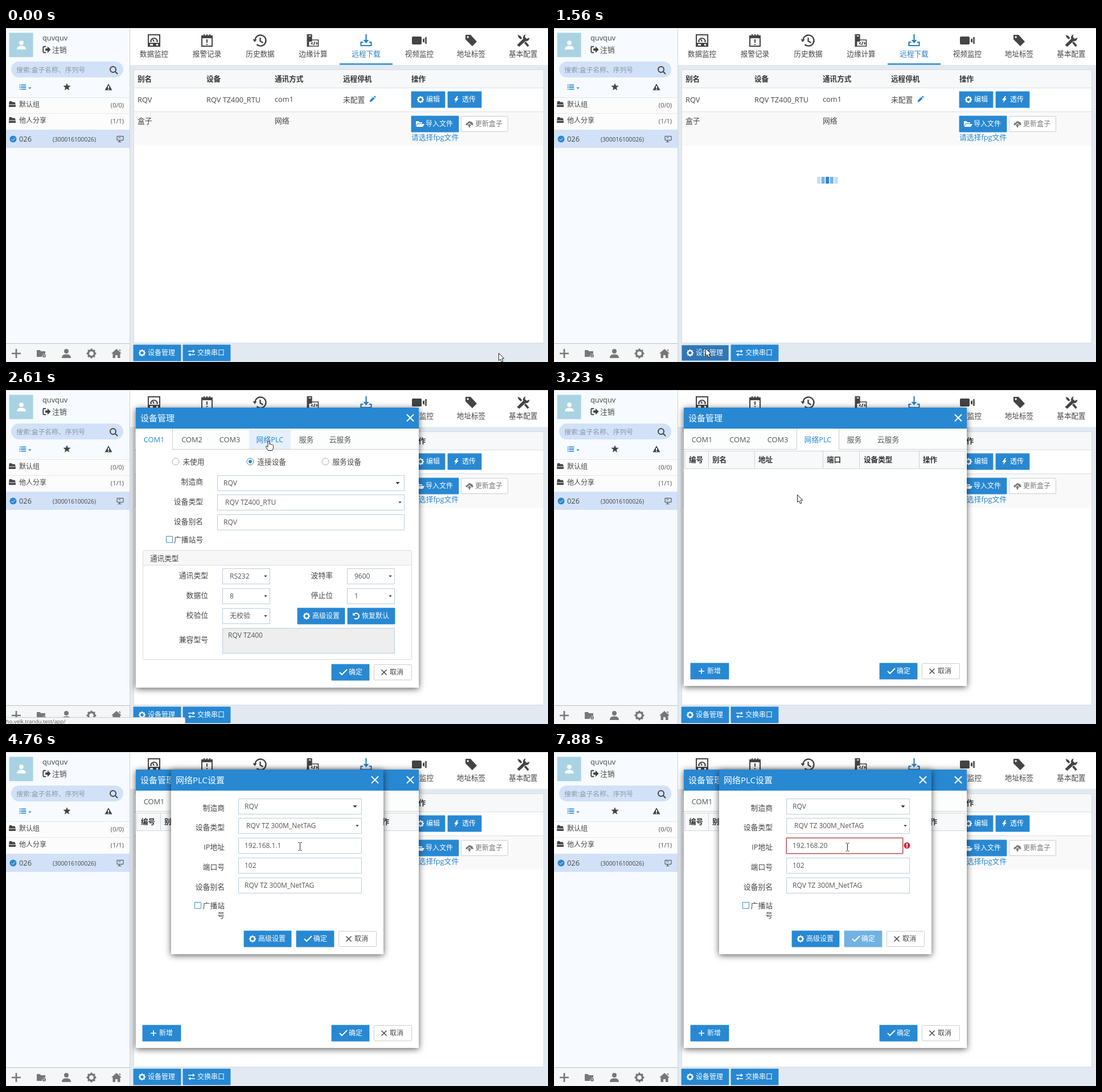
An HTML page with a canvas for the animation above (8 s loop, 952 px wide and 588 px high).

```html
<!DOCTYPE html>
<html lang="zh-CN">
<head>
<meta charset="utf-8">
<style>
html, body { margin: 0; width: 100%; height: 100%; overflow: hidden; background: #e2e9f0; }
canvas { display: block; }
</style>
</head>
<body>
<canvas id="stage" width="952" height="588"></canvas>
<script>
const ctx = document.getElementById('stage').getContext('2d');
const LOOP = 8000;
const BLUE = '#2888d2', DARK = '#444', GREY = '#555', FIELD = '#b9ccdb';
const BRAND = 'RQV', NET_MODEL = 'RQV TZ 300M_NetTAG';

// ---- primitives ----
function box(x, y, w, h, fill, stroke, r = 0) {
  ctx.beginPath();
  const o = stroke ? 0.5 : 0;
  ctx.roundRect(x + o, y + o, w - 2 * o, h - 2 * o, r);
  if (fill) { ctx.fillStyle = fill; ctx.fill(); }
  if (stroke) { ctx.strokeStyle = stroke; ctx.lineWidth = 1; ctx.stroke(); }
}

function text(s, x, y, { size = 12.8, color = DARK, align = 'left', weight = 400 } = {}) {
  ctx.font = `${weight} ${size}px "Open Sans", "Noto Sans CJK SC", "Noto Sans CJK", sans-serif`;
  ctx.fillStyle = color;
  ctx.textAlign = align;
  ctx.fillText(s, x, Math.round(y + size * 0.37));
}

function disc(x, y, r, fill, stroke) {
  ctx.beginPath();
  ctx.arc(x, y, r, 0, 7);
  if (fill) { ctx.fillStyle = fill; ctx.fill(); }
  if (stroke) { ctx.strokeStyle = stroke; ctx.lineWidth = 1; ctx.stroke(); }
}

// ---- icons: [filled path, stroked path, line width], centred on 0,0 ----
const gearPath = Array.from({ length: 32 }, (_, i) => {
  const a = (i - 0.5) * Math.PI / 16, r = i % 4 < 2 ? 6.2 : 5;
  return `${i ? 'L' : 'M'}${r * Math.cos(a)} ${r * Math.sin(a)}`;
}).join('') + 'zM2.700 0A2.700 2.700 0 1 0-2.700 0A2.700 2.700 0 1 0 2.700 0z';
const starPath = Array.from({ length: 10 }, (_, i) => {
  const a = i * Math.PI / 5, r = i % 2 ? 3 : 7;
  return `${i ? 'L' : 'M'}${r * Math.sin(a)} ${-r * Math.cos(a)}`;
}).join('') + 'z';

const icons = {
  gear: [gearPath],
  star: [starPath],
  user: ['M-4-4a4 4 0 1 1 8 0a4 4 0 1 1-8 0zM-8 8c0-5 3-6.500 8-6.500s8 1.500 8 6.500z'],
  exit: ['M-2-2H2V-6L8 0 2 6V2H-2z', 'M-1-5.500H-4.500Q-6-5.500-6-4V4Q-6 5.500-4.500 5.500H-1', 2],
  search: ['', 'M4-1A5 5 0 1 1-6-1A5 5 0 1 1 4-1M2.500 2.500L7 7', 2],
  list: ['', 'M-6-4h2M-3-4H7M-6 0h2M-3 0H7M-6 4h2M-3 4H7', 2],
  caret: ['M-3.500-2h7L0 2z'],
  warn: ['M0-6L6.500 5.500h-13zM-1-2h2v4h-2zM-1 3h2v1.500h-2z'],
  drawer: ['M-5-5h4l1 1.500h4.500l1.500 4h-12zM-6 1.500h12V4q0 1-1 1H-5q-1 0-1-1z'],
  monitor: ['', 'M-5.500-5H5.500V2H-5.500zM-1 2V5M-4 5H2M-3-2.500H1', 1],
  folderGear: ['M-8-6h6l1 2h8v4.500a5 5 0 0 0-6 5.500h-9z', 'M7 4A2 2 0 1 1 3 4A2 2 0 1 1 7 4', 2],
  home: ['M0-8L9 0H6.500V8H2V3H-2V8H-6.500V0H-9zM4-7h3v4z'],
  gauge: ['M-11-11h22v22h-22zM-9-9V4H9V-9zM-7 6v3h5v-3zM4 6v3h3v-3z', 'M-6 2A6 6 0 0 1 6 2M0 2L-2-2M-7 1.500H-4M4 1.500H7', 2],
  alarm: ['M-10-8h20v4h-20z', 'M-9-8H9V10H-9zM-5-11v5M0-11v5M5-11v5M0-2V4M0 6v2', 2],
  history: ['M-13-2h7l-3.500 5z', 'M-9 0A9.500 9.500 0 1 1-6 7M0-5V1L5 4', 2.4],
  edge: ['M-11-11H-2V2H-8V11H-11zM-9-9v2h5v-2z', 'M-8-11V10H9V-1H-3V-10M-1 3l-2 2 2 2M5 3l2 2-2 2M3 2L1 8', 1.7],
  download: ['M-5-1H5L0 5z', 'M0-11V2M-5 3H-9V9H9V3H5', 2.2],
  video: ['M-11-7H2q2 0 2 2V5q0 2-2 2H-11q-2 0-2-2V-5q0-2 2-2zM6-2L9-4V4L6 2z', 'M11.500-6V6', 2.5],
  tag: ['M-10-9q0-1 1-1H-1L10 2 2 10-10-2zM-7.500-6a1.700 1.700 0 1 0 3.400 0a1.700 1.700 0 1 0-3.400 0z'],
  tools: ['M4-11l-1 5 3 3 5-2Q10 2 4 1L-7 11-11 8 0-3Q-2-8 4-11zM-10-10L-5-8-2-4-4-2-8-5z', 'M3 3L9 10', 3.5],
  pencil: ['M-6 6l1-4L1-4 4-1-2 5zM2-5l2-1.500L6.500-4 5-2z'],
  bolt: ['M1-6L-4 1H-1L-2.500 6 4-2H1L3-6z'],
  folder: ['M-7-5h5l1 2h5v2H-4L-7 4zM-3.500 0H8L5 5H-6.500z'],
  cloud: ['M-6.500 2Q-6.500-2-3.500-2Q-1-6.500 2.500-4Q6.500-3.500 6.500 2H4L0-2-4 2zM0-.5L3.500 3H1.300V6H-1.300V3H-3.500z'],
  swap: ['M2-6L6-3 2 0zM-2 0L-6 3-2 6z', 'M-6-3H3M6 3H-3', 1.6],
  plus: ['', 'M-5 0H5M0-5V5', 1.7],
  check: ['', 'M-6 0L-2 4 7-5', 2],
  cross: ['', 'M-4.500-4.500L4.500 4.500M4.500-4.500L-4.500 4.500', 1.5],
  undo: ['M-6-6v5h5z', 'M-4-3A5 5 0 1 1-3 4', 2]
};

function icon(name, x, y, color = DARK, scale = 1) {
  const [fill, line, width] = icons[name];
  ctx.save();
  ctx.translate(x, y);
  ctx.scale(scale, scale);
  if (fill) { ctx.fillStyle = color; ctx.fill(new Path2D(fill), 'evenodd'); }
  if (line) { ctx.strokeStyle = color; ctx.lineWidth = width; ctx.stroke(new Path2D(line)); }
  ctx.restore();
}

// ---- widgets ----
function button(x, y, w, label, glyph, { kind = 'blue', pad = 25 } = {}) {
  const looks = {
    blue: [BLUE, null, '#fff'], hot: ['#3276b4', '#62a8e4', '#fff'],
    off: ['#72b2e3', null, '#fff'], plain: ['#fff', '#ccc', DARK], faint: ['#fff', '#ccc', '#777']
  };
  const [fill, edge, color] = looks[kind];
  const bleed = edge ? 0 : 0.4;
  box(x - bleed, y - bleed, w + 2 * bleed, 28 + 2 * bleed, fill, edge, 1);
  icon(glyph, x + pad - 10, y + 14, color);
  text(label, x + pad, y + 14, { size: 12, color });
}

function field(x, y, w, value, arrow, pad = 11) {
  box(x, y, w, 28, '#fff', FIELD);
  text(value, x + pad, y + 14, { size: 12, color: GREY });
  if (arrow) icon('caret', x + w - arrow, y + 14, '#333', arrow > 10 ? 1 : 0.8);
}

const label = (s, right, y) => text(s, right, y, { align: 'right' });
const okCancel = (x, y, kind) => {
  button(x, y, 66, '确定', 'check', { pad: 30, kind });
  button(x + 74, y, 67, '取消', 'cross', { pad: 28, kind: 'plain' });
};

function checkbox(x, y) { box(x, y, 12, 12, '#fff', '#3d8fd0'); }

function dialog(x, y, w, h, title, progress, body) {
  const scale = 0.6 + 0.4 * progress;
  ctx.save();
  ctx.globalAlpha = progress;
  ctx.translate(x + w / 2, y + h / 2);
  ctx.scale(scale, scale);
  ctx.translate(-x - w / 2, -y - h / 2);
  ctx.save();
  ctx.shadowColor = 'rgba(0,0,0,.65)';
  ctx.shadowBlur = 11;
  ctx.shadowOffsetY = 2;
  box(x, y, w, h, '#fff');
  ctx.restore();
  box(x, y, w, 37, BLUE);
  text(title, x + 8, y + 18, { size: 15, color: '#fff' });
  icon('cross', x + w - 15, y + 18, '#fff', 1.35);
  body();
  ctx.restore();
}

// ---- scene parts ----
function sidebar() {
  box(0, 0, 217, 588, '#f7fbff');
  box(217, 0, 1, 588, '#ccd3d9');
  box(5.6, 8.6, 42, 42.6, '#a9d3e2');
  icon('user', 27, 30, '#fff', 0.98);
  text('quvquv', 64, 17);
  icon('exit', 71, 38, DARK, 0.95);
  text('注销', 81, 38);

  box(9, 59, 197, 28, '#d1e1f7', null, 14);
  text('搜索:盒子名称、序列号', 18, 74, { size: 11.8, color: '#8b97a8' });
  icon('search', 189, 74);
  icon('list', 29, 104, BLUE, 0.9);
  icon('caret', 42, 106, BLUE, 0.8);
  icon('star', 107, 104);
  icon('warn', 180, 104);

  box(0, 123, 217, 56, '#fcfcfc');
  box(0, 122, 217, 1, '#e0e4e8');
  box(0, 150, 217, 1, '#e4e8ec');
  [['默认组', '(0/0)', 135], ['他人分享', '(1/1)', 163]].forEach(([name, count, y]) => {
    icon('drawer', 11, y - 1);
    text(name, 23, y, { size: 12 });
    text(count, 207, y + 1, { size: 11, align: 'right', color: GREY });
  });
  box(0, 179, 217, 32, '#d2e1f7');
  disc(12.5, 195.5, 6, BLUE);
  icon('check', 12.5, 196, '#fff', 0.5);
  text('026', 23, 195);
  text('(300016100026)', 82, 196, { size: 10.2 });
  icon('monitor', 200.5, 195.5);

  box(0, 555, 217, 33, '#f4f6f8');
  box(0, 555, 217, 1, '#b9bfc5');
  icon('plus', 18, 573, '#777', 1.6);
  icon('folderGear', 62, 573, '#777');
  icon('user', 106, 573, '#777');
  icon('gear', 150, 573, '#777', 1.4);
  icon('home', 194, 573, '#777');
}

function mainPage(hot) {
  box(218, 0, 734, 65, '#fff');
  box(0, 0, 952, 1, '#cfd5da');
  const nav = [['数据监控', 'gauge', 260], ['报警记录', 'alarm', 353], ['历史数据', 'history', 446.5],
    ['边缘计算', 'edge', 539.5], ['远程下载', 'download', 632.5], ['视频监控', 'video', 726],
    ['地址标签', 'tag', 817], ['基本配置', 'tools', 908.5]];
  nav.forEach(([name, glyph, x]) => {
    const color = glyph === 'download' ? '#2a7fc6' : DARK;
    icon(glyph, x, 22, color);
    text(name, x, 45, { align: 'center', color, size: 12.6 });
  });
  box(586, 62.3, 93, 2.4, BLUE);

  box(224, 73, 721, 482, '#fff', '#d8dde2');
  box(225, 74, 719, 31, '#f7f8f9');
  box(225, 148, 719, 59, '#f9f9f9');
  [105, 147].forEach(y => box(225, y, 719, 1, '#ddd'));
  [['别名', 231], ['设备', 352], ['通讯方式', 472], ['远程停机', 592], ['操作', 712]]
    .forEach(([s, x]) => text(s, x, 89, { size: 12.6, weight: 600, color: '#333' }));
  text(BRAND, 231, 126);
  text('RQV TZ400_RTU', 352, 126);
  text('com1', 472, 125);
  text('未配置', 592, 126);
  icon('pencil', 644, 125, BLUE, 0.9);
  text('盒子', 231, 163);
  text('网络', 472, 163);
  button(712, 112, 59, '编辑', 'gear', { pad: 26 });
  button(776, 112, 59, '透传', 'bolt');
  button(712, 155, 83, '导入文件', 'folder');
  button(799, 155, 83, '更新盒子', 'cloud', { kind: 'faint' });
  text('请选择fpg文件', 712, 192, { color: BLUE });
  button(224, 558, 83, '设备管理', 'gear', { kind: hot ? 'hot' : 'blue' });
  button(311, 558, 83, '交换串口', 'swap');
}

function spinner(t) {
  const peak = 2 + (t - 1560) / 90;
  for (let i = 0; i < 5; i++) {
    const d = ((i - peak) % 5 + 7.5) % 5 - 2.5;
    ctx.globalAlpha = Math.max(0.28, 1 - Math.abs(d) * 0.37);
    box(462 + i * 7.6, 262, 6, 12, BLUE);
  }
  ctx.globalAlpha = 1;
}

function tabStrip(active, hover) {
  box(228, 68, 497, 36, '#fcfdfd');
  box(228, 104, 497, 1, '#ccc');
  const tabs = [['COM1', 228, 64], ['COM2', 293, 67], ['COM3', 360, 66], ['网络PLC', 427, 73],
    ['服务', 501, 53], ['云服务', 554, 66]];
  tabs.forEach(([name, x, w], i) => {
    if (i === hover && i !== active) box(x, 69, w, 35, '#e5f0fb');
    if (i === active) {
      box(x, 68, w, 37, '#fff');
      box(x - 1, 68, 1, 37, '#ccc');
      box(x + w, 68, 1, 37, '#ccc');
    }
    text(name, x + w / 2, 87, { align: 'center', color: i === active || i === hover ? BLUE : GREY });
  });
}

function comTab() {
  [['未使用', 298], ['连接设备', 429], ['服务设备', 561]].forEach(([s, x], i) => {
    disc(x, 126, 6, '#fff', i === 1 ? BLUE : '#aaa');
    if (i === 1) disc(x, 126, 3, BLUE);
    text(s, x + 12.5, 126, { size: 12.6 });
  });
  label('制造商', 346, 161);
  label('设备类型', 346, 196);
  label('设备别名', 346, 231);
  field(371, 150, 329, BRAND, 12);
  field(371, 184, 329, 'RQV TZ400_RTU', 8, 14);
  field(371, 219, 329, BRAND);
  checkbox(281, 257);
  text('广播站号', 295, 263);

  box(240, 282, 473, 193, '#fff', '#d9d9d9', 2);
  box(241, 283, 471, 25, '#f7f7f7');
  box(241, 308, 471, 1, '#ddd');
  text('通讯类型', 253, 296, { size: 12.6 });
  [['通讯类型', 'RS232', 314], ['数据位', '8', 349], ['校验位', '无校验', 384]].forEach(([s, v, y]) => {
    label(s, 355, y + 12);
    field(380, y, 84, v, 8, 13);
  });
  [['波特率', '9600', 314], ['停止位', '1', 349]].forEach(([s, v, y]) => {
    label(s, 574, y + 12);
    field(599, y, 84, v, 8, 13);
  });
  button(512, 384, 83, '高级设置', 'gear', { pad: 26 });
  button(600, 384, 83, '恢复默认', 'undo');
  label('兼容型号', 355, 439);
  box(380, 419, 303, 45, '#eee', FIELD);
  text('RQV TZ400', 390, 432, { size: 12, color: GREY });
  okCancel(572, 483, 'blue');
}

function networkTab(hot) {
  box(229, 107, 494, 32, '#f8f9fa', '#ccd3d9');
  [271, 352, 472, 536, 641].forEach(x => box(x, 107, 1, 32, '#ccd3d9'));
  [['编号', 237], ['别名', 278], ['地址', 359], ['端口', 479], ['设备类型', 544], ['操作', 648]]
    .forEach(([s, x]) => text(s, x, 122, { size: 12.6, weight: 600, color: '#333' }));
  button(240, 481, 67, '新增', 'plus', { pad: 29, kind: hot ? 'hot' : 'blue' });
  okCancel(572, 481, 'blue');
}

const typed = [[7330, '192.168.20'], [7180, '192.168.2'], [6550, '192.168.'], [6400, '192.168.1'],
  [6240, '192.168.1.'], [0, '192.168.1.1']];

function plcForm(t) {
  const invalid = t >= 6240, focused = t >= 5080;
  const ip = typed.find(([from]) => t >= from)[1];
  [['制造商', 98], ['设备类型', 132], ['IP地址', 167], ['端口号', 202], ['设备别名', 237]]
    .forEach(([s, y]) => label(s, 384, y));
  field(408, 82, 217, BRAND, 12);
  field(408, 116, 217, NET_MODEL, 8, 14);
  const width = invalid ? 205 : 217;
  if (focused) box(406.5, 149.5, width + 3, 31, invalid ? '#f0c8c8' : '#c4def4', null, 2);
  field(408, 151, width, ip);
  if (focused) box(408, 151, width, 28, null, invalid ? '#a93a3f' : '#66afe9');
  if (between(t, 5080, 5630) || between(t, 6090, 6630) || between(t, 7180, 7880)) {
    ctx.font = '12px "Open Sans", sans-serif';
    box(Math.round(419 + ctx.measureText(ip).width), 157, 1, 15, '#222');
  }
  if (invalid) {
    disc(620, 164.5, 5.5, '#d02c48');
    box(619, 161, 2, 4, '#fff');
    box(619, 166, 2, 2, '#fff');
  }
  field(408, 186, 217, '102');
  field(408, 221, 217, NET_MODEL);
  checkbox(331, 264);
  label('广播站', 384, 270);
  label('号', 384, 287);
  button(418, 315, 83, '高级设置', 'gear');
  okCancel(510, 315, invalid ? 'off' : 'blue');
}

function statusBar() {
  box(-2, 576, 317, 14, '#f5f6f7', '#ccc', 2);
  text('ho.velk.trandu.test/app/', 0, 584, { size: 9.3, color: '#555' });
}

// ---- pointer: time, x, y ----
const trail = [[60, 865, 572], [240, 760, 470], [420, 600, 412], [620, 420, 440], [850, 271, 532],
  [1250, 266, 564], [1640, 266, 564], [1950, 400, 330], [2230, 540, 108], [2380, 526, 94],
  [2600, 461, 89], [3080, 461, 89], [3400, 390, 290], [3760, 284, 502], [3850, 284, 502],
  [4300, 420, 300], [4690, 518, 165], [4759, 518, 165], [4760, 516, 166], [4929, 516, 166], [4930, 515, 167]];

const pointers = {
  arrow: 'M0 0V13L3 10.500 5 15.500 7.500 14.500 5.500 9.500H9.500z',
  hand: 'M-1.500 1.500Q0-1 1.500 1.500V6Q4 5 5 7Q7 6 8 8V13L6 17H-1L-5 11Q-5 8-3 9.500L-1.500 11z',
  beam: 'M-3-7H-1L0-6 1-7H3M0-6V6M-3 7H-1L0 6 1 7H3'
};

function pointerKind(t) {
  if (t >= 4500) return 'beam';
  return between(t, 900, 1400) || between(t, 2300, 3200) || between(t, 3650, 4000) ? 'hand' : 'arrow';
}

function pointer(t) {
  const next = trail.findIndex(k => k[0] > t);
  const b = trail[next < 0 ? trail.length - 1 : next];
  const a = next > 0 ? trail[next - 1] : b;
  const k = a === b ? 0 : (t - a[0]) / (b[0] - a[0]);
  const kind = pointerKind(t), path = new Path2D(pointers[kind]);
  ctx.save();
  ctx.translate(Math.round(a[1] + (b[1] - a[1]) * k) + 0.5, Math.round(a[2] + (b[2] - a[2]) * k) + 0.5);
  ctx.lineWidth = 1;
  ctx.strokeStyle = '#222';
  ctx.fillStyle = '#fff';
  if (kind !== 'beam') ctx.fill(path);
  ctx.stroke(path);
  ctx.restore();
}

// ---- timeline ----
function between(t, from, to) { return t >= from && t < to; }

function opening(t, start) {
  const k = Math.min(1, Math.max(0, (t - start) / 300));
  return 1 - (1 - k) ** 3;
}

function draw(t) {
  box(0, 0, 952, 588, '#e2e9f0');
  sidebar();
  mainPage(between(t, 920, 1710));
  if (between(t, 1400, 1710)) spinner(t);
  if (t >= 1680) {
    const network = t >= 2840;
    const hover = between(t, 2300, 2450) ? 4 : between(t, 2450, 3200) ? 3 : -1;
    dialog(228, 31, 497, network ? 490 : 493, '设备管理', opening(t, 1680), () => {
      tabStrip(network ? 3 : 0, hover);
      if (network) networkTab(between(t, 3650, 3950));
      else comTab();
    });
  }
  if (t >= 3890) dialog(290, 31, 373, 325, '网络PLC设置', opening(t, 3890), () => plcForm(t));
  if (between(t, 2380, 3150)) statusBar();
  pointer(t);
}

function tick() {
  draw(performance.now() % LOOP);
  requestAnimationFrame(tick);
}
tick();
</script>
</body>
</html>
```
